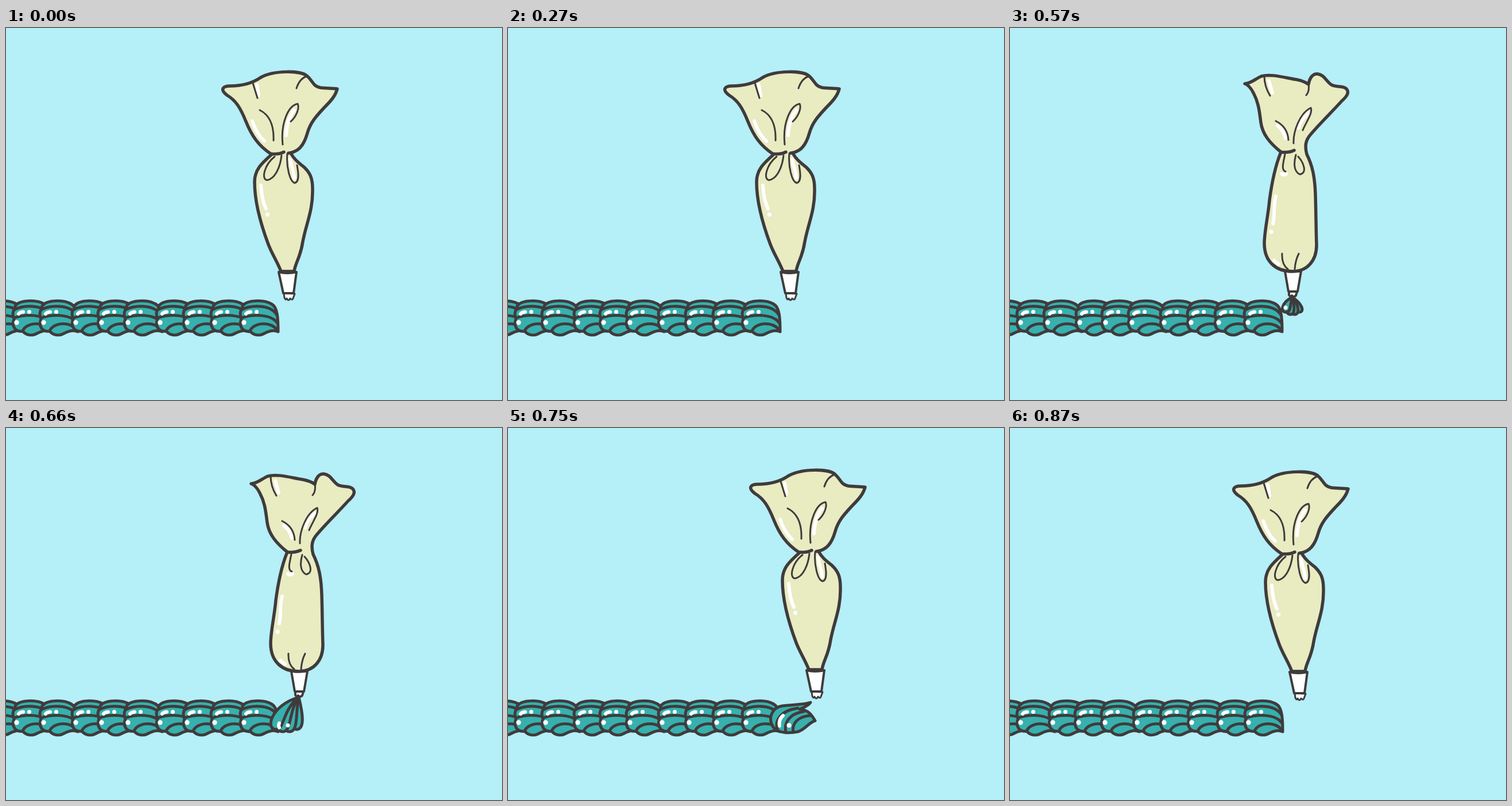
An HTML page for the animation above (900 ms loop, 864 by 648 pixels).

```html
<!DOCTYPE html>
<html lang="en">
<head>
<meta charset="utf-8">
<title>Piping bag</title>
<style>
html, body { margin: 0; width: 100%; height: 100%; overflow: hidden; background: #b5eff8; }
svg { display: block; width: 100%; height: 100%; stroke: #3f3b3c; stroke-linecap: round; stroke-linejoin: round; }
.bag { fill: #e9ebc1; stroke-width: 5.5; }
.fold { fill: none; stroke-width: 3; }
.metal { fill: #fff; stroke-width: 4; }
.teeth { fill: #fff; stroke-width: 3; }
.cream { fill: #37b0ae; stroke-width: 5; }
.line { fill: none; stroke-width: 5; }
.shine { fill: none; stroke: #fff; stroke-width: 6; }
.dot { fill: #fff; stroke: none; }
</style>
</head>
<body>
<svg viewBox="0 0 864 648">
<defs>
  <g id="twist">
    <path class="cream" d="M412 484C420 473 450 473 463 481C473 487 474 505 474 529C466 525 458 528 452 531C442 537 432 536 425 528C412 530 405 519 410 507C406 497 409 491 412 489Z"/>
    <path class="line" d="M410 491C425 483 460 480 472 500M410 505C430 498 462 498 473 514M425 528C430 514 458 509 473 526"/>
    <path class="shine" d="M418 498Q420 495 426 494.500"/>
    <circle class="dot" cx="436.500" cy="494.500" r="3.5"/>
    <circle class="dot" cx="414.500" cy="513" r="4.2"/>
  </g>
</defs>
<g id="rope"></g>
<g id="blob"></g>
<g id="fan">
  <path class="cream" d="M462 521C452 505 460 487 478 484C495 482 515 482 527 478C522 485 512 488 508 490C525 491 530 502 535 510C525 512 518 525 505 529C490 532 470 532 462 521Z"/>
  <path class="line" d="M470 526C463 510 475 492 505 488M484 530C480 512 492 497 515 494M497 530C494 515 505 502 527 501"/>
  <path class="shine" d="M473 519Q471 508 479 501"/>
  <circle class="dot" cx="489.500" cy="518" r="4"/>
</g>
<g id="relaxed">
  <path class="bag" d="M463 220C445 236 433 247 433 268C433 305 445 345 457 377C464 395 473 408 479 424L502 424C504 408 513 400 517 372C523 340 535 318 534 280C534 262 530 253 520 243C509 234 502 229 496 218"/>
  <path class="bag" d="M484 216Q474 221 461 219C440 205 428 188 418 163C408 138 400 126 385 117C372 107 378 101 390 101C408 101 428 97 444 86C465 74 514 73 525 84C536 94 534 101 548 104C558 105 568 105 577 106C574 118 566 127 554 139C540 154 530 165 525 183C519 204 510 216 492 218"/>
  <path class="shine" d="M437 99L440 118M429 162C435 180 442 190 450 197M502 143C492 155 489 170 488 187M495 228C497 243 502 250 502 262M444 274C445 290 448 305 453 315"/>
  <circle class="dot" cx="455.500" cy="325" r="3.7"/>
  <path class="fold" d="M430 96L438 122M442 143C460 152 467 170 466 196M524 84C515 87 509 95 506 105M482 203C478 165 492 135 508 132C512 140 505 155 496 163M480 222C478 240 470 262 455 265C444 264 450 238 468 224M490 219C488 240 494 268 503 270C512 268 509 250 507 239"/>
  <path class="teeth" d="M484 462L485 470Q487 475 489 471Q492 477 495 471Q499 475 500 471L503 463Z"/>
  <path class="metal" d="M475 425Q490 429 506 425L501 462L483 462Z"/>
</g>
<g id="squeezed">
  <path class="metal" d="M486 459L486 465Q489 470 491 466Q494 470 498 466L500 459Z"/>
  <path class="metal" d="M479 424L507 424L501 459L485 459Z"/>
  <path class="bag" d="M472 216C452 200 440 185 437 165C434 140 432 128 424 113C420 105 415 99 409 97C420 97 428 88 438 84C455 79 480 87 500 90C510 92 516 95 520 98C522 86 528 79 536 80C548 82 550 92 560 99C570 104 580 100 586 106C592 112 586 120 578 127C560 147 540 166 524 185C515 195 513 205 517 220C527 240 531 260 532 290C533 320 533 350 534 378C534 405 518 424 492 424C464 424 443 408 443 375C443 355 450 325 452 300C456 270 462 240 472 216Q485 218 495 213"/>
  <path class="shine" d="M451 92L457 113M466 170C474 176 478 184 480 192M520 148C510 158 504 165 503 174M463 293C458 310 462 325 458 341M473 254Q477 257 481 254M460 405Q463 409 468 411"/>
  <circle class="dot" cx="455" cy="355" r="3.7"/>
  <path class="fold" d="M443 84C443 95 447 108 453 118M520 98Q522 110 516 117M463 162C475 168 484 178 485 195M494 201C493 180 505 148 524 139C528 148 515 165 510 178M479 220C476 235 472 248 480 250M498 221C494 235 494 250 505 255C518 253 512 235 502 224M474 393Q473 412 484 420M503 393Q497 405 496 420"/>
</g>
</svg>
<script>
const $ = id => document.getElementById(id);
const show = (id, on) => $(id).style.display = on ? '' : 'none';
const move = (id, x, y) => $(id).setAttribute('transform', `translate(${x} ${y})`);

const STEP = 30, LOOP = 900, START = 18;
const bagX = [0, 0, 5, 11, 18, 28, 38, 45, 44, 36, 24, 12];
const bagY = [0, 0, 0, 0, 0, 0, 0, -3, -14, -21, -12, 0];
const scroll = [0, 0, 0, 0, 0, 0, 0, 0, 8, 22, 38, 47];

$('rope').innerHTML = [-444, -396, -349, -293, -248, -202, -146, -99, -51, 0, 48]
  .map(x => `<use href="#twist" x="${x}"/>`).join('');
const newTwist = $('rope').lastChild;

// Strands hanging from the nozzle, spreading as the cream reaches the rope
function drawBlob(tip, growth) {
  const u = Math.min(growth, 1), left = 473 - 15 * u, right = tip + 19 - 11 * u;
  const top = 469, bottom = 499 + 30 * u, drop = bottom - top;
  const w = (right - left) / 6;
  let out = '';
  for (let i = 3; i >= 0; i--) {
    const x = left + w * (1.2 + i * 1.2), b = bottom - (i % 3 ? 0 : 4);
    out += `<path class="cream" d="M${tip} ${top}C${x - w} ${top + drop * .25} ${x - w * 1.8} ${b} ${x} ${b}` +
      `C${x + w * 1.6} ${b} ${x + w} ${top + drop * .4} ${tip} ${top}Z"/>`;
  }
  const y = bottom - 12;
  out += growth < .7
    ? `<circle class="dot" cx="${left + 7}" cy="${y}" r="3.5"/>`
    : `<path class="shine" d="M${left + 18} ${y - 3}Q${left + 16} ${y + 2} ${left + 18} ${y + 5}"/>` +
      `<circle class="dot" cx="${left + 33}" cy="${y + 1}" r="3.5"/>`;
  $('blob').innerHTML = out;
}

function draw(now) {
  const i = Math.floor(now % LOOP / STEP) - START;
  const x = bagX[i] || 0, y = bagY[i] || 0, shift = scroll[i] || 0;
  const squeezing = i >= 0 && i < 7;
  show('squeezed', squeezing);
  show('relaxed', !squeezing);
  show('blob', squeezing);
  show('fan', i === 7 || i === 8);
  newTwist.style.display = i > 8 ? '' : 'none';
  if (squeezing) drawBlob(492 + x, (i - 1) / 3);
  move('rope', -shift, 0);
  move('fan', -shift, 0);
  move('squeezed', x, y);
  move('relaxed', x, y);
  requestAnimationFrame(draw);
}
draw(0);
</script>
</body>
</html>
```
